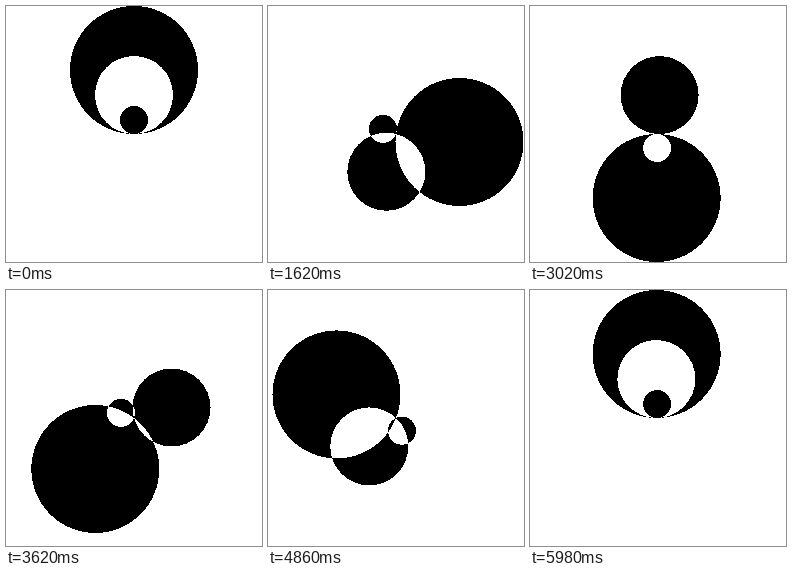
An HTML page for the animation above (6 s loop, 256 px wide and 256 px high).

```html
<!DOCTYPE html>
<html lang="en">
<head>
<meta charset="utf-8">
<title>Three rolling discs</title>
<style>
  html, body { margin: 0; width: 100%; height: 100%; overflow: hidden; background: #fff; }
  svg { display: block; width: 100%; height: 100%; }
</style>
</head>
<body>
<svg viewBox="0 0 256 256" shape-rendering="crispEdges">
  <path id="discs" fill="#000" fill-rule="evenodd"/>
</svg>
<script>
  const LOOP = 6000, STEP = 20, CENTER = 128;
  // Every disc touches the stage center and swings around it clockwise.
  const DISCS = [
    { radius: 64, turns: 1 },
    { radius: 39, turns: 2 },
    { radius: 14, turns: 3 },
  ];
  const path = document.getElementById('discs');

  function circle(x, y, r) {
    return `M${x - r} ${y}a${r} ${r} 0 1 1 ${2 * r} 0a${r} ${r} 0 1 1 ${-2 * r} 0Z`;
  }

  function render(ms) {
    const time = Math.floor((ms % LOOP) / STEP) * STEP;
    const angle = time / LOOP * 2 * Math.PI;
    path.setAttribute('d', DISCS.map(({ radius, turns }) => circle(
      CENTER + radius * Math.sin(turns * angle),
      CENTER - radius * Math.cos(turns * angle),
      radius
    )).join(''));
  }

  const start = performance.now();
  function tick() {
    render(performance.now() - start);
    requestAnimationFrame(tick);
  }
  tick();
</script>
</body>
</html>
```
